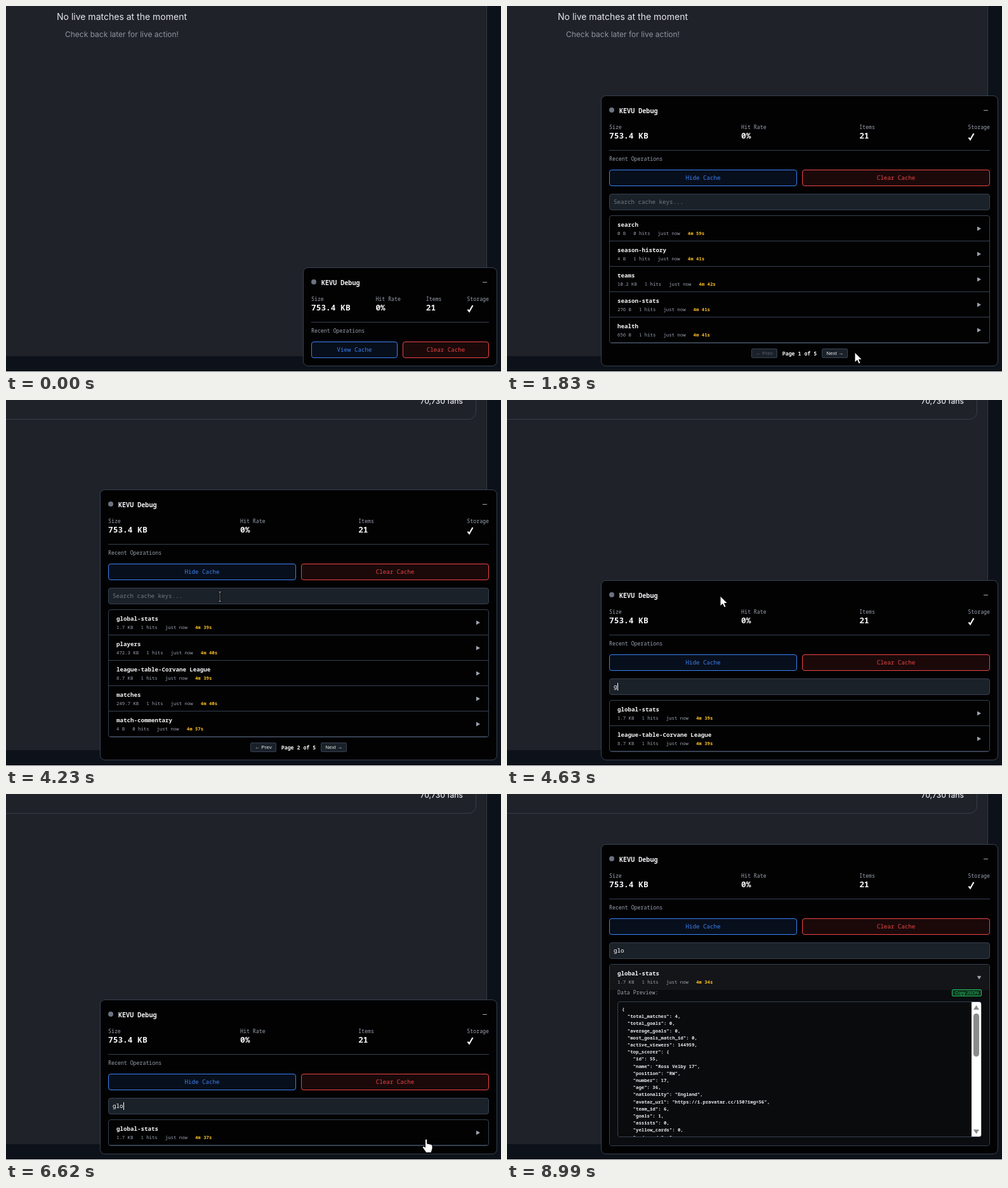
These frames come from a looping animation (780x577 px, 9.52 s). An HTML page:

```html
<!DOCTYPE html>
<html lang="en">
<head>
<meta charset="utf-8">
<title>Cache debug panel</title>
<style>
  html, body { margin: 0; width: 100%; height: 100%; overflow: hidden; background: #0d121a; }
  * { box-sizing: border-box; }
  #stage { position: relative; width: 780px; height: 577px; overflow: hidden;
    border-bottom: 1px solid #e8e8e8; font-family: Inter, sans-serif; }
  .page { position: absolute; left: 0; top: 0; width: 758px; height: 552px; overflow: hidden;
    background: #1f2229; border-right: 1px solid #343a44; }
  .empty { position: absolute; left: 0; top: 7px; width: 365px; text-align: center; line-height: 20px;
    font-size: 14px; color: #e5e7eb; }
  .empty p { margin: 8px 0 0; font-size: 12px; color: #8f949e; line-height: 20px; }
  .card { position: absolute; left: -20px; top: -60px; width: 761px; height: 91px;
    border: 1px solid #373d48; border-radius: 12px; }
  .fans { position: absolute; right: 20px; top: 51px; line-height: 20px; font-size: 12px; font-weight: 500; color: #e5e7eb; }

  /* --k keeps the mono advance at 0.55em */
  #panel { --k: .917; position: absolute; right: 6px; bottom: 8px; width: 626px; padding: 188px 12px 12px;
    background: #020203; border: 1px solid #374151; border-radius: 8px; color: #f3f4f6;
    font-family: "Noto Sans Mono", "DejaVu Sans Mono", monospace; white-space: nowrap; }
  #panel.mini { width: 306px; padding-top: 142px; }
  .mini .search, .mini #list, .mini #pager { display: none; }
  .s8 { font-size: calc(8px * var(--k)); }
  .s9 { font-size: calc(9px * var(--k)); }
  .s10 { font-size: calc(10px * var(--k)); }
  .s11 { font-size: calc(11px * var(--k)); }
  .s14 { font-size: calc(14px * var(--k)); }
  .bold { font-weight: 700; }
  .grey { color: #9ca3af; }
  .at { position: absolute; left: 12px; line-height: 20px; }
  .dot { top: 18px; width: 8px; height: 8px; border-radius: 50%; background: #6b7280; }
  .dash { left: auto; right: 15px; top: 22px; width: 7px; height: 1px; background: #9ca3af; }
  .stats { right: 12px; top: 39px; display: flex; justify-content: space-between; }
  .stats b { display: block; margin-top: -7px; line-height: 20px; color: #f3f4f6; }
  .stats svg { display: block; margin: -2px 0 0; }
  .rule { right: 12px; top: 85px; height: 1px; background: #374151; }
  .buttons { right: 12px; top: 116px; height: 26px; display: flex; gap: 8px; text-align: center; }
  .buttons div { flex: 1; line-height: 24px; border: 1px solid; border-radius: 4px; }
  .view { color: #3b82f6; background: rgba(59, 130, 246, .1); }
  .clear { color: #ef4444; background: rgba(239, 68, 68, .1); }
  .search { right: 12px; top: 154px; height: 26px; padding-left: 6px; line-height: 24px; color: #fff;
    background: #1b2129; border: 1px solid #374151; border-radius: 4px; }
  .hint { color: #757b85; }
  #caret { position: absolute; top: 6px; width: 1px; height: 12px; background: #fff; }

  #list { border: 1px solid #374151; border-radius: 4px; overflow: hidden; }
  .row { position: relative; height: 40px; padding: 3.5px 0 0 12px; border-bottom: 1px solid #374151; }
  .row div { line-height: 20px; }
  .meta { display: flex; gap: 12px; margin-top: -7px; }
  .ttl { color: #fbbf24; font-weight: 700; }
  .tri { position: absolute; right: 13px; top: 16.5px; width: 6px; height: 7px; background: #9ca3af;
    clip-path: polygon(0 0, 100% 50%, 0 100%); }
  .open .row { background: #141518; border: 0; }
  .more { position: relative; height: 245px; background: #0b0c0f; }
  .more .at { top: -6px; }
  .copy { position: absolute; right: 12px; top: -1px; height: 11px; padding: 0 4px; border: 1px solid #22c55e;
    border-radius: 2px; background: rgba(34, 197, 94, .2); color: #22c55e; font: 7px/9px "Liberation Sans", Arial, sans-serif; }
  .json { position: absolute; left: 12px; right: 12px; top: 18px; height: 214px; padding: 6px; overflow: hidden;
    white-space: pre; line-height: 11.2px; font-weight: 600; color: #e5e7eb; background: #0a0b0d;
    border: 1px solid #374151; border-radius: 4px; }
  .bar { position: absolute; right: 0; top: 0; }
  #pager { display: flex; justify-content: center; align-items: center; gap: 8px; height: 15px; margin-top: 8px; font-weight: 600; }
  #pager i { height: 15px; padding: 0 6px; border: 1px solid #374151; background: #1b2129; color: #e5e7eb;
    border-radius: 2px; font: 8px/13px "Liberation Sans", Arial, sans-serif; }
  #pager i.off { color: #596170; }
  #mouse { position: absolute; left: 0; top: 0; overflow: visible; }
  #mouse path { fill: #fff; stroke: #000; stroke-width: 1; stroke-linejoin: round; }
</style>
</head>
<body>
<div id="stage">
  <div class="page">
    <div class="empty" id="empty">No live matches at the moment<p>Check back later for live action!</p></div>
    <div class="card" id="card"><div class="fans">70,730 fans</div></div>
  </div>
  <div id="panel">
    <div class="at dot"></div>
    <div class="at s11 bold" style="left:28px;top:12.5px">KEVU Debug</div>
    <div class="at dash"></div>
    <div class="at stats s9 grey">
      <div>Size<b class="s14">753.4 KB</b></div>
      <div>Hit Rate<b class="s14">0%</b></div>
      <div>Items<b class="s14">21</b></div>
      <div>Storage<svg width="12" height="14"><path d="M1.5 8.5L4 11.5L9.5 2" fill="none" stroke="#f3f4f6" stroke-width="2.2"/></svg></div>
    </div>
    <div class="at rule"></div>
    <div class="at s9 grey" style="top:89px">Recent Operations</div>
    <div class="at buttons s10"><div class="view" id="view"></div><div class="clear">Clear Cache</div></div>
    <div class="at search s10"><span id="query"></span><div id="caret"></div></div>
    <div id="list"></div>
    <div id="pager" class="s9"></div>
  </div>
  <svg id="mouse" width="20" height="26"><path/></svg>
</div>
<script>
const LOOP = 9520, STEP = 130;
const $ = id => document.getElementById(id);

// key | size | hits | seconds to live
const items = [
  'search|0 B|0|300', 'season-history|4 B|1|282', 'teams|10.2 KB|1|283',
  'season-stats|276 B|1|282', 'health|656 B|1|282',
  'global-stats|1.7 KB|1|282', 'players|472.3 KB|1|283', 'league-table-Corvane League|8.7 KB|1|282',
  'matches|249.7 KB|1|283', 'match-commentary|4 B|0|300'
].map(s => s.split('|'));

const json = `{
  "total_matches": 4,
  "total_goals": 0,
  "average_goals": 0,
  "most_goals_match_id": 0,
  "active_viewers": 144959,
  "top_scorer": {
    "id": 55,
    "name": "Ross Velby 17",
    "position": "RW",
    "number": 17,
    "age": 36,
    "nationality": "England",
    "avatar_url": "https://i.pravatar.cc/150?img=56",
    "team_id": 6,
    "goals": 1,
    "assists": 0,
    "yellow_cards": 0,
    "red_cards": 0,`;

const details = `<div class="more"><div class="at s9 grey">Data Preview:</div><div class="copy">Copy JSON</div>
<div class="json s8">${json}<svg class="bar" width="15" height="212"><path fill="#fff" d="M0 0H15V212H0z"/>
<path fill="#8b8b8b" d="M3 12L7.5 5L12 12zM3 201L7.5 208L12 201z"/>
<rect x="3" y="18" width="9" height="68" rx="4.5" fill="#8b8b8b"/></svg></div></div>`;

// start, steps, end x, end y
const moves = [
  [790, 1, 463, 553], [920, 3, 672, 533], [1310, 4, 548, 546],
  [2100, 4, 517, 549], [2620, 2, 524, 554],
  [3020, 2, 336, 348], [3300, 1, 338, 325], [3430, 1, 337, 310], [4630, 1, 336, 309],
  [5830, 4, 583, 558], [6490, 3, 702, 537],
  [7280, 5, 722, 300], [8070, 1, 728, 301], [8210, 6, 749, 539]
];

const shapes = {
  arrow: 'M0 0V16L3.8 12.5L6.3 18L9 17L6.6 11.5H11.5Z',
  hand: 'M-1.5 11V1.5a1.5 1.5 0 0 1 3 0V7l6 1.3q2.5 .5 2.5 3V15l-2 6.5H0L-5.5 13.5q0-2 2-2L-1.5 13z',
  beam: 'M-3 -8H3V-6.5H.8V6.5H3V8H-3V6.5H-.8V-6.5H-3Z'
};

const within = (t, a, b) => t >= a && t < b;

function mouseAt(t) {
  let x = 463, y = 553;
  for (const [start, steps, ex, ey] of moves) {
    if (t < start) break;
    const p = Math.min(1, (Math.floor((t - start) / STEP) + 1) / steps);
    x += (ex - x) * p;
    y += (ey - y) * p;
  }
  return [x, y];
}

function mouseShape(t) {
  if (within(t, 3300, 4630)) return 'beam';
  return within(t, 3020, 3300) || within(t, 6490, 6880) || within(t, 7670, 8210) ? 'hand' : 'arrow';
}

function caretOn(t) {
  return within(t, 3700, 4230) || within(t, 4630, 5690) || within(t, 6220, 6750);
}

function rowHtml([key, size, hits, life], ticks, angle) {
  const left = life - ticks;
  const ttl = `${Math.floor(left / 60)}m ${left % 60}s`;
  return `<div class="row"><div class="s10 bold">${key}</div><div class="meta s8 grey"><span>${size}</span>` +
    `<span>${hits} hits</span><span>just now</span><span class="ttl">${ttl}</span></div>` +
    `<div class="tri" style="transform:rotate(${angle}deg)"></div></div>`;
}

const shown = {};
function setHtml(id, html) {
  if (shown[id] !== html) $(id).innerHTML = shown[id] = html;
}

function show(id, on) {
  $(id).style.display = on ? '' : 'none';
}

function render(t) {
  const opened = t >= 1830, scrolled = t >= 3830, expanded = t >= 6880;
  const page = t < 2490 ? 1 : 2;
  const query = 'glo'.slice(0, [4630, 5030, 5160].filter(s => t >= s).length);
  const ticks = Math.floor((t - 690) / 1000);
  const angle = expanded ? Math.min(90, Math.floor((t - 6880) / STEP) * 45) : 0;

  show('empty', !scrolled);
  show('card', scrolled);
  $('panel').className = opened ? '' : 'mini';
  setHtml('view', opened ? 'Hide Cache' : 'View Cache');
  setHtml('query', query || '<span class="hint">Search cache keys...</span>');
  $('caret').style.left = 6 + 5.5 * query.length + 'px';
  show('caret', caretOn(t));

  const visible = query ? items.filter(i => i[0].includes(query)) : items.slice(page * 5 - 5, page * 5);
  $('list').className = expanded ? 'open' : '';
  setHtml('list', visible.map(i => rowHtml(i, ticks, angle)).join('') + (expanded ? details : ''));
  show('pager', !query);
  setHtml('pager', `<i class="${page < 2 ? 'off' : ''}">← Prev</i><span>Page ${page} of 5</span><i>Next →</i>`);

  const [x, y] = mouseAt(t), mouse = $('mouse');
  show('mouse', within(t, 790, 8990));
  mouse.style.transform = `translate(${Math.round(x)}px, ${Math.round(y)}px)`;
  mouse.firstChild.setAttribute('d', shapes[mouseShape(t)]);
}

const begin = performance.now();
function tick() {
  render((performance.now() - begin) % LOOP);
  requestAnimationFrame(tick);
}
tick();
</script>
</body>
</html>
```
